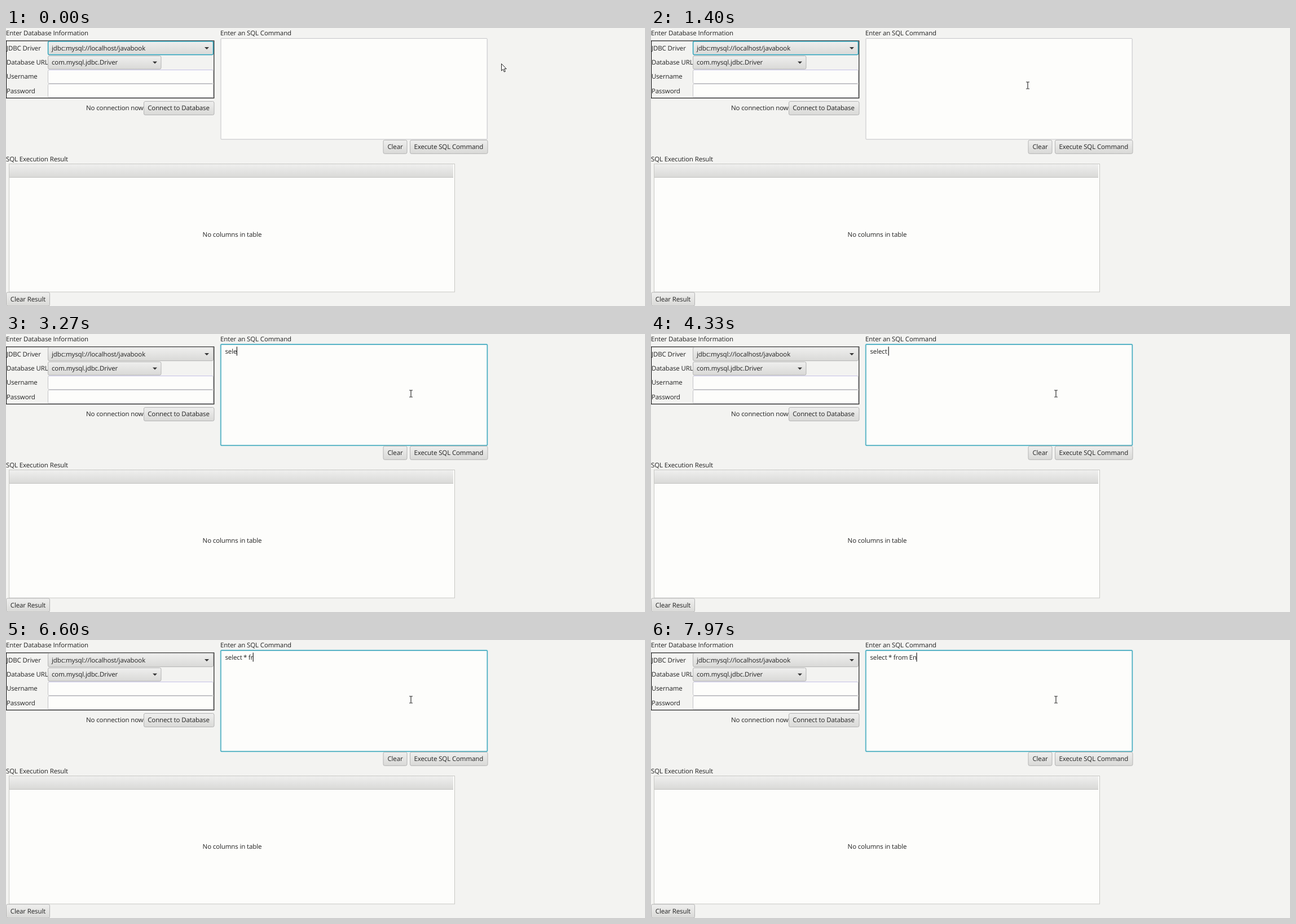
These frames come from a looping animation (1133 by 494 pixels, 8 s). An HTML page:

```html
<!DOCTYPE html>
<html lang="en">
<head>
<meta charset="utf-8">
<title>SQL client</title>
<style>
html, body { margin: 0; width: 100%; height: 100%; overflow: hidden; background: #f3f3f1; }
svg { display: block; width: 1133px; height: 494px; }
text {
  font: 11.5px "Open Sans", "Noto Sans", sans-serif;
  letter-spacing: -.12px;
  fill: #222;
  white-space: pre;
  text-rendering: geometricPrecision;
}
.mid { text-anchor: middle; }
.end { text-anchor: end; }
.button { fill: url(#body); stroke: #b4b4b4; }
.button.hover { fill: url(#light); }
.field { fill: #fdfdfb; stroke: #c3c3c7; }
.arrow { fill: #333; }
.button.focus, .field.focus { stroke: #2299b2; stroke-width: 1.2; }
.glow { fill: none; stroke: #8fd6e2; stroke-opacity: .7; }
#typed { word-spacing: -.4px; }
</style>
</head>
<body>
<svg viewBox="0 0 1133 494">
  <defs>
    <linearGradient id="body" x2="0" y2="1">
      <stop stop-color="#efefee"/><stop offset="1" stop-color="#d9d9d7"/>
    </linearGradient>
    <linearGradient id="light" x2="0" y2="1">
      <stop stop-color="#f7f7f6"/><stop offset="1" stop-color="#e4e4e2"/>
    </linearGradient>
  </defs>
  <rect width="1133" height="494" fill="#f3f3f1"/>

  <text x="0" y="12.5">Enter Database Information</text>
  <text x="380" y="12.5">Enter an SQL Command</text>
  <text x="0" y="236.5">SQL Execution Result</text>

  <rect x=".5" y="22.8" width="368.3" height="101.7" fill="none" stroke="#1c1c1c" stroke-width="1.2"/>
  <text x="1" y="39.5">JDBC Driver</text>
  <text x="1" y="65">Database URL</text>
  <text x="1" y="90.2">Username</text>
  <text x="1" y="115.5">Password</text>

  <rect id="driver" class="button" x="74.5" y="23.6" width="293" height="24" rx="2.5"/>
  <rect id="driverGlow" class="glow" x="75.5" y="24.6" width="291" height="22" rx="2"/>
  <text x="81" y="39.5">jdbc:mysql://localhost/javabook</text>
  <path class="arrow" d="M352 34h8l-4 4z"/>
  <rect id="url" class="button" x="74.5" y="49.5" width="200.5" height="23.5" rx="2.5"/>
  <text x="81" y="65">com.mysql.jdbc.Driver</text>
  <path class="arrow" d="M260 59.5h8l-4 4z"/>
  <rect class="field" x="74.5" y="74.5" width="293" height="24" rx="2"/>
  <path d="M76 74.5H366" stroke="#c4c0e6"/>
  <rect class="field" x="74.5" y="99.5" width="293" height="24" rx="2"/>

  <text class="end" x="243.7" y="146.2">No connection now</text>
  <rect id="connect" class="button" x="244.5" y="130.5" width="124.5" height="24" rx="2.5"/>
  <text class="mid" x="306" y="146.2">Connect to Database</text>

  <rect id="areaGlow" class="glow" x="380" y="17.6" width="474.2" height="181.2" rx="2"/>
  <rect id="area" class="field" x="381" y="18.6" width="472.2" height="179.2" rx="1"/>
  <text id="typed" x="388.5" y="35"></text>
  <rect id="caret" y="22.5" width="1.2" height="16" fill="#222"/>

  <rect id="clear" class="button" x="669" y="199.3" width="42" height="24" rx="2.5"/>
  <text class="mid" x="690" y="215.2">Clear</text>
  <rect id="run" class="button" x="716.5" y="199.3" width="137.5" height="24" rx="2.5"/>
  <text class="mid" x="784.8" y="215.2">Execute SQL Command</text>

  <rect x="5.5" y="241.5" width="790" height="227.5" fill="#fdfdfb" stroke="#c8c8c4"/>
  <rect x="6" y="242" width="787" height="23.5" fill="url(#body)"/>
  <path d="M6 265.5H793" stroke="#c4c4c2"/>
  <text class="mid" x="401" y="371">No columns in table</text>
  <rect class="button" x=".5" y="469.7" width="77" height="24.3" rx="2.5"/>
  <text class="mid" x="39" y="485.8">Clear Result</text>

  <path id="pointer" d="M.5.5V13L3.4 10.3 5.3 15 7.3 14.2 5.4 9.6H9.2Z" fill="#fff" stroke="#222"/>
  <path id="beam" d="M-3-6H-.8L0-5.4.8-6H3M0-5.4V5.4M-3 6H-.8L0 5.4.8 6H3" fill="none" stroke="#333" stroke-width="1.2"/>
</svg>
<script>
const LOOP = 8000, CLICK = 1600;
const $ = id => document.getElementById(id);

// pointer path: time, x, y
const path = [[60, 878, 63], [600, 139, 62], [950, 139, 62], [1500, 718, 106]];
const sentence = 'select * from En';
const keys = [2640, 2830, 3000, 3180, 3440, 3680, 3950, 4980,
              5450, 6080, 6480, 6760, 6960, 7220, 7600, 7860];
const hoverable = ['driver', 'url', 'connect', 'clear', 'run'].map($);
const fields = [...document.querySelectorAll('.field')];

const ease = p => p * p * (3 - 2 * p);

function pointerAt(t) {
  const i = path.findIndex(p => p[0] > t);
  if (i === 0) return path[0].slice(1);
  if (i < 0) return path[path.length - 1].slice(1);
  const [t0, x0, y0] = path[i - 1], [t1, x1, y1] = path[i];
  const k = ease((t - t0) / (t1 - t0));
  return [x0 + (x1 - x0) * k, y0 + (y1 - y0) * k];
}

function inside(el, x, y) {
  const b = el.getBBox();
  return x >= b.x && x <= b.x + b.width && y >= b.y && y <= b.y + b.height;
}

const show = (el, on) => el.setAttribute('visibility', on ? 'visible' : 'hidden');

function draw(t) {
  const [x, y] = pointerAt(t).map(Math.round);
  const overText = fields.some(f => inside(f, x, y));
  $('pointer').setAttribute('transform', `translate(${x} ${y})`);
  $('beam').setAttribute('transform', `translate(${x} ${y})`);
  show($('pointer'), !overText);
  show($('beam'), overText);
  hoverable.forEach(el => el.classList.toggle('hover', inside(el, x, y)));

  const editing = t >= CLICK;
  $('driver').classList.toggle('focus', !editing);
  $('area').classList.toggle('focus', editing);
  show($('driverGlow'), !editing);
  show($('areaGlow'), editing);

  const count = keys.filter(k => k <= t).length;
  const typed = $('typed');
  typed.textContent = sentence.slice(0, count);
  const width = count ? typed.getComputedTextLength() : 0;
  const since = t - (count ? keys[count - 1] : CLICK);
  $('caret').setAttribute('x', 388 + width);
  show($('caret'), editing && since % 1000 < 500);
}

const start = performance.now();
function tick(now) {
  draw(Math.max(0, now - start) % LOOP);
  requestAnimationFrame(tick);
}
draw(0);
requestAnimationFrame(tick);
</script>
</body>
</html>
```
